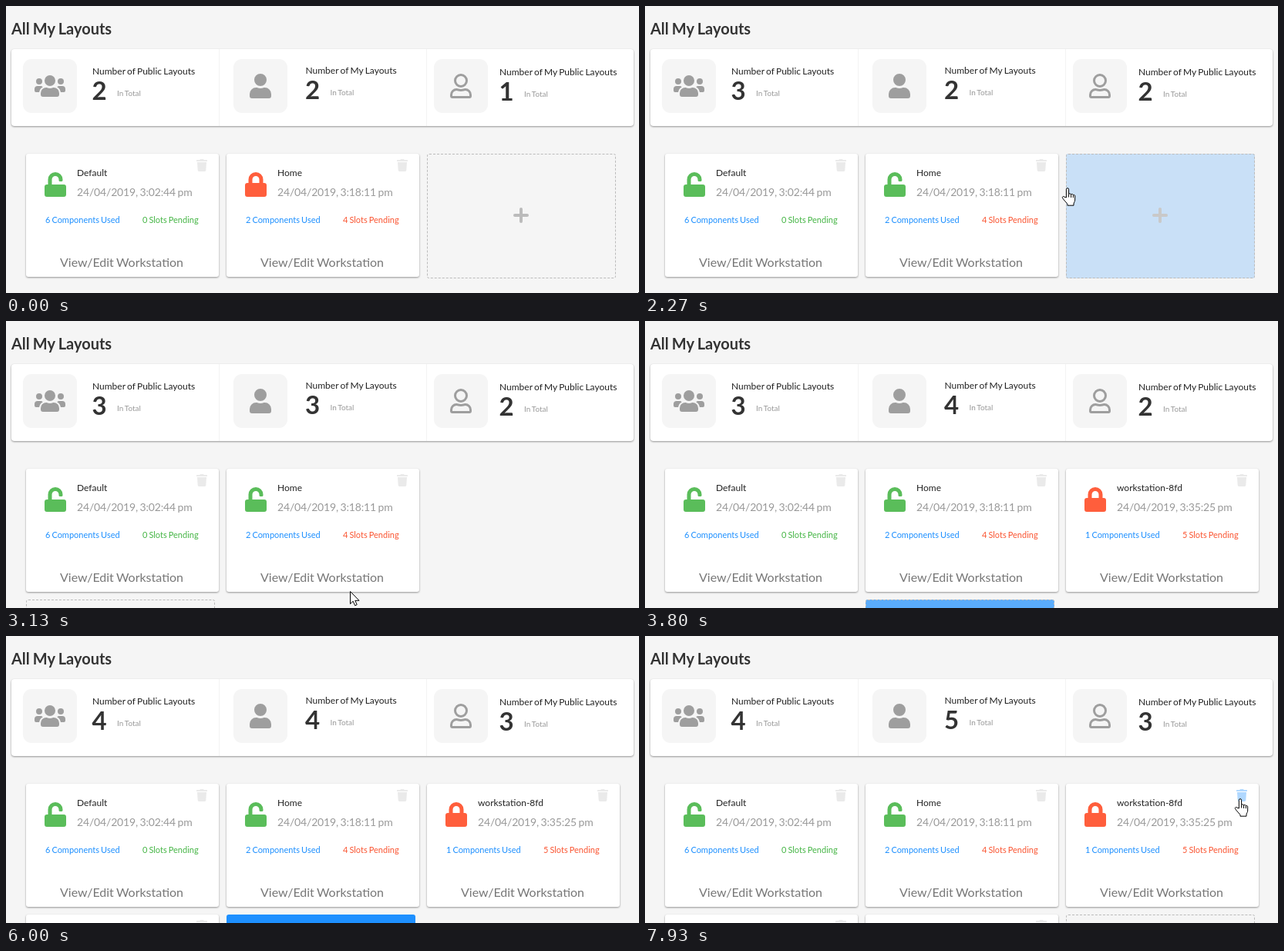
Animation, 821 px wide and 373 px high, one loop 8 s. Source, as an HTML page:

```html
<!DOCTYPE html>
<html lang="en">
<head>
<meta charset="utf-8">
<title>All My Layouts</title>
<style>
html, body { margin: 0; width: 100%; height: 100%; overflow: hidden; background: #f5f5f5; }
svg { display: block; width: 821px; height: 373px; font-family: Lato, sans-serif; word-spacing: -.05em; }
.panel { fill: #fff; filter: drop-shadow(0 1px 1px #0006); }
.dashed { box-sizing: border-box; width: 245px; height: 162px; border: 1px dashed #bbb; border-radius: 3px; }
.date { letter-spacing: -.012em; }
</style>
</head>
<body>
<svg id="stage" viewBox="0 0 821 373"></svg>
<script>
const LOOP = 8000, BLUE = '#1e90ff', GREEN = '#5abd5a', RED = '#ff5e3c', PALE = '#eaeaea';
const stage = document.getElementById('stage');

const disc = (x, y, r) => `M${x - r} ${y}a${r} ${r} 0 0 1 ${2 * r} 0a${r} ${r} 0 0 1 ${-2 * r} 0z`;
const ICONS = {
  locked: 'M25 14h-1.5V9.5a9.5 9.5 0 0 0-19 0V14H3a3 3 0 0 0-3 3v12a3 3 0 0 0 3 3h22a3 3 0 0 0 3-3V17a3 3 0 0 0-3-3zm-6.5 0h-9V9.5a4.5 4.5 0 0 1 9 0z',
  open: 'M25 16H9.5V9.5a4.5 4.5 0 0 1 9 0v1a1.5 1.5 0 0 0 1.5 1.5h2a1.5 1.5 0 0 0 1.5-1.5v-1a9.5 9.5 0 0 0-19 0V16H3a3 3 0 0 0-3 3v10a3 3 0 0 0 3 3h22a3 3 0 0 0 3-3V19a3 3 0 0 0-3-3z',
  user: disc(14, 8, 8) + 'M19.6 18h-1a11 11 0 0 1-9.2 0h-1A8.4 8.4 0 0 0 0 26.4V29a3 3 0 0 0 3 3h22a3 3 0 0 0 3-3v-2.6A8.4 8.4 0 0 0 19.6 18z',
  userLine: disc(14, 9, 9) + disc(14, 9, 6) + 'M19.6 19c-1.8 0-2.7 1-5.6 1s-3.8-1-5.6-1A8.4 8.4 0 0 0 0 27.4V29a3 3 0 0 0 3 3h22a3 3 0 0 0 3-3v-1.6A8.4 8.4 0 0 0 19.6 19zM25 29H3v-1.6A5.4 5.4 0 0 1 8.4 22c.9 0 2.4 1 5.6 1s4.7-1 5.6-1a5.4 5.4 0 0 1 5.4 5.4z',
  users: disc(20, 9, 7) + disc(6, 10, 4) + disc(34, 10, 4) +
    'M24.8 18h-.5a9.8 9.8 0 0 1-8.6 0h-.5A7.2 7.2 0 0 0 8 25.2V27a3 3 0 0 0 3 3h18a3 3 0 0 0 3-3v-1.8A7.2 7.2 0 0 0 24.8 18z' +
    'M10.8 17.2A4 4 0 0 0 8 16H4a4 4 0 0 0-4 4v2a2 2 0 0 0 2 2h4.1a9 9 0 0 1 4.7-6.8z' +
    'M29.2 17.2A4 4 0 0 1 32 16h4a4 4 0 0 1 4 4v2a2 2 0 0 1-2 2h-4.1a9 9 0 0 0-4.7-6.8z',
  trash: 'M13.5 1H9.7L9.5.4A.8.8 0 0 0 8.8 0H5.2a.8.8 0 0 0-.7.4L4.3 1H.5a.5.5 0 0 0-.5.5v1a.5.5 0 0 0 .5.5h13a.5.5 0 0 0 .5-.5v-1a.5.5 0 0 0-.5-.5zM1 4h12l-.7 10.6a1.5 1.5 0 0 1-1.5 1.4H3.2a1.5 1.5 0 0 1-1.5-1.4z'
};

function add(parent, tag, attrs, content) {
  const el = document.createElementNS('http://www.w3.org/2000/svg', tag);
  for (const key in attrs) el.setAttribute(key, attrs[key]);
  if (content !== undefined) el.textContent = content;
  return parent.appendChild(el);
}
const text = (parent, x, y, size, fill, content, extra) =>
  add(parent, 'text', { x, y, 'font-size': size, fill, ...extra }, content);
const icon = (parent, name, x, y, fill) =>
  add(parent, 'path', { d: ICONS[name], transform: `translate(${x} ${y})`, fill, 'fill-rule': 'evenodd' });
const place = (el, x, y) => el.setAttribute('transform', `translate(${x} ${y})`);
const show = (el, on) => el.setAttribute('visibility', on ? 'visible' : 'hidden');
const slotX = i => 26 + i % 3 * 260;
const slotY = i => 192 + Math.floor(i / 3) * 170;

// Header and statistics
text(stage, 7, 37, 20, '#333', 'All My Layouts', { 'font-weight': 700 });
add(stage, 'rect', { x: 7, y: 56, width: 807, height: 100, rx: 4, class: 'panel' });
for (const x of [276, 545]) add(stage, 'rect', { x, y: 56, width: 1, height: 100, fill: '#f3f3f3' });

function stat(tileX, iconName, iconX, x, y, label) {
  add(stage, 'rect', { x: tileX, y: 69, width: 70, height: 70, rx: 11, fill: '#f5f5f5' });
  icon(stage, iconName, iconX, 88, '#9e9e9e');
  text(stage, x, y, 12, '#222', label);
  text(stage, x + 32, y + 28, 10, '#999', 'In Total');
  return text(stage, x - .5, y + 33, 33, '#333', '', { 'font-weight': 700 });
}
const counters = [
  stat(22, 'users', 37, 112, 89, 'Number of Public Layouts'),
  stat(295, 'user', 316, 388.5, 88, 'Number of My Layouts'),
  stat(555, 'userLine', 576, 640, 90, 'Number of My Public Layouts')
];

// Layout cards
function card(index, name, time, used, pending, isOpen) {
  const g = add(stage, 'g', {});
  place(g, slotX(index), slotY(index));
  add(g, 'rect', { width: 250, height: 160, rx: 3, class: 'panel' });
  const lock = icon(g, isOpen ? 'open' : 'locked', 24, 24, isOpen ? GREEN : RED);
  const trash = icon(g, 'trash', 221, 7, PALE);
  text(g, 66, 29, 12, '#222', name);
  text(g, 66, 55, 14, '#999', `24/04/2019, ${time} pm`, { class: 'date' });
  text(g, 25, 90, 11, BLUE, `${used} Components Used`);
  text(g, 151, 90, 11, pending ? '#fa5532' : '#45b545', `${pending} Slots Pending`);
  text(g, 124, 147, 16, '#777', 'View/Edit Workstation', { 'text-anchor': 'middle' });
  return { g, lock, trash };
}
card(0, 'Default', '3:02:44', 6, 0, true);
const home = card(1, 'Home', '3:18:11', 2, 4, false);
const added = ['workstation-8fd', 'workstation-2c7', 'workstation-5ab'].map((name, i) =>
  card(i + 2, name, `3:35:2${5 + i}`, 1, 5, false));

// Slot for a new layout
const slot = add(stage, 'g', {});
const slotFill = add(slot, 'rect', { width: 245, height: 162, rx: 3, fill: BLUE });
const border = add(slot, 'foreignObject', { width: 245, height: 162 });
border.innerHTML = '<div xmlns="http://www.w3.org/1999/xhtml" class="dashed"></div>';
const plusPath = { d: 'M114 80h16M122 72v16', 'stroke-width': 4, 'stroke-linecap': 'round' };
add(slot, 'path', { ...plusPath, stroke: '#bbb' });
const plus = add(slot, 'path', { ...plusPath, stroke: '#fff' });

// Pointers, with the hot spot at 0,0
const hand = add(stage, 'g', { stroke: '#000', 'stroke-linejoin': 'round', fill: '#fff' });
add(hand, 'path', { d: 'M-1.6 12V1.3a1.6 1.6 0 0 1 3.2 0V7.5c.4-1 2.8-.8 3 .5.5-.9 2.6-.6 2.8.7.6-.7 2.3-.3 2.3 1.2V15c0 2-1.5 3.5-1.7 5v2.2H0V20.6C-.8 19-4.6 15.5-6.4 12.7c-1-1.8 1-2.8 2.3-1.6z' });
add(hand, 'path', { d: 'M1.6 7.5v4M4.6 8v4M7.4 9v3.2' });
const arrow = add(stage, 'path', { d: 'M.5.5v16.2l3.7-3.5 2.4 5.6 2.6-1.1-2.4-5.4h5.2z', fill: '#fff', stroke: '#000' });
const corner = add(stage, 'rect', { x: 820, y: 372, width: 1, height: 1 });

// Timeline
const CLICKS = [2670, 3670, 6270];
const HOVERS = [2230, 3270, 5770];
const UNLOCK = 1670, PUBLISH = 5330;
const PATH = [[0, 576, 380], [500, 576, 380], [830, 455, 318], [1130, 308, 212], [1330, 315, 234], [1770, 315, 234],
  [2440, 626, 238], [2670, 626, 238], [3250, 400, 380], [6450, 425, 380], [6800, 487, 264],
  [7070, 507, 222], [7900, 772, 212], [LOOP, 772, 212]];

const ramp = (t, start, length) => Math.min(1, Math.max(0, (t - start) / length));

function pointerAt(t) {
  const i = PATH.findIndex(p => p[0] > t);
  const [a, b] = [PATH[i - 1], PATH[i]];
  const k = (t - a[0]) / (b[0] - a[0]);
  return [1, 2].map(n => Math.round(a[n] + (b[n] - a[n]) * k));
}

function render(t) {
  const clicks = CLICKS.filter(c => t >= c).length;
  const unlocked = t >= UNLOCK, published = t >= PUBLISH;
  const publicCount = unlocked + published;
  [2 + publicCount, 2 + clicks, 1 + publicCount].forEach((n, i) => counters[i].textContent = n);

  home.lock.setAttribute('d', unlocked ? ICONS.open : ICONS.locked);
  home.lock.setAttribute('fill', unlocked ? GREEN : RED);
  added.forEach((c, i) => c.g.setAttribute('opacity', ramp(t, CLICKS[i] + 530, 270)));
  added[0].trash.setAttribute('fill', t > 7830 ? '#b0d8ff' : PALE);

  place(slot, slotX(2 + clicks), slotY(2 + clicks));
  const blue = Math.max(...HOVERS.map((h, i) => ramp(t, h, 200) - ramp(t, CLICKS[i] + 60, 250)));
  slotFill.setAttribute('opacity', blue);
  show(border, blue < .95);
  plus.setAttribute('opacity', blue);

  const [x, y] = pointerAt(t);
  const clickable = t > 1130 && t < 1830 || t > 2230 && t < 2700 || t > 7830;
  place(hand, x, y);
  place(arrow, x, y);
  show(hand, clickable);
  show(arrow, !clickable);
  show(corner, t < 270);
}

function tick() {
  render(performance.now() % LOOP);
  requestAnimationFrame(tick);
}
tick();
</script>
</body>
</html>
```
